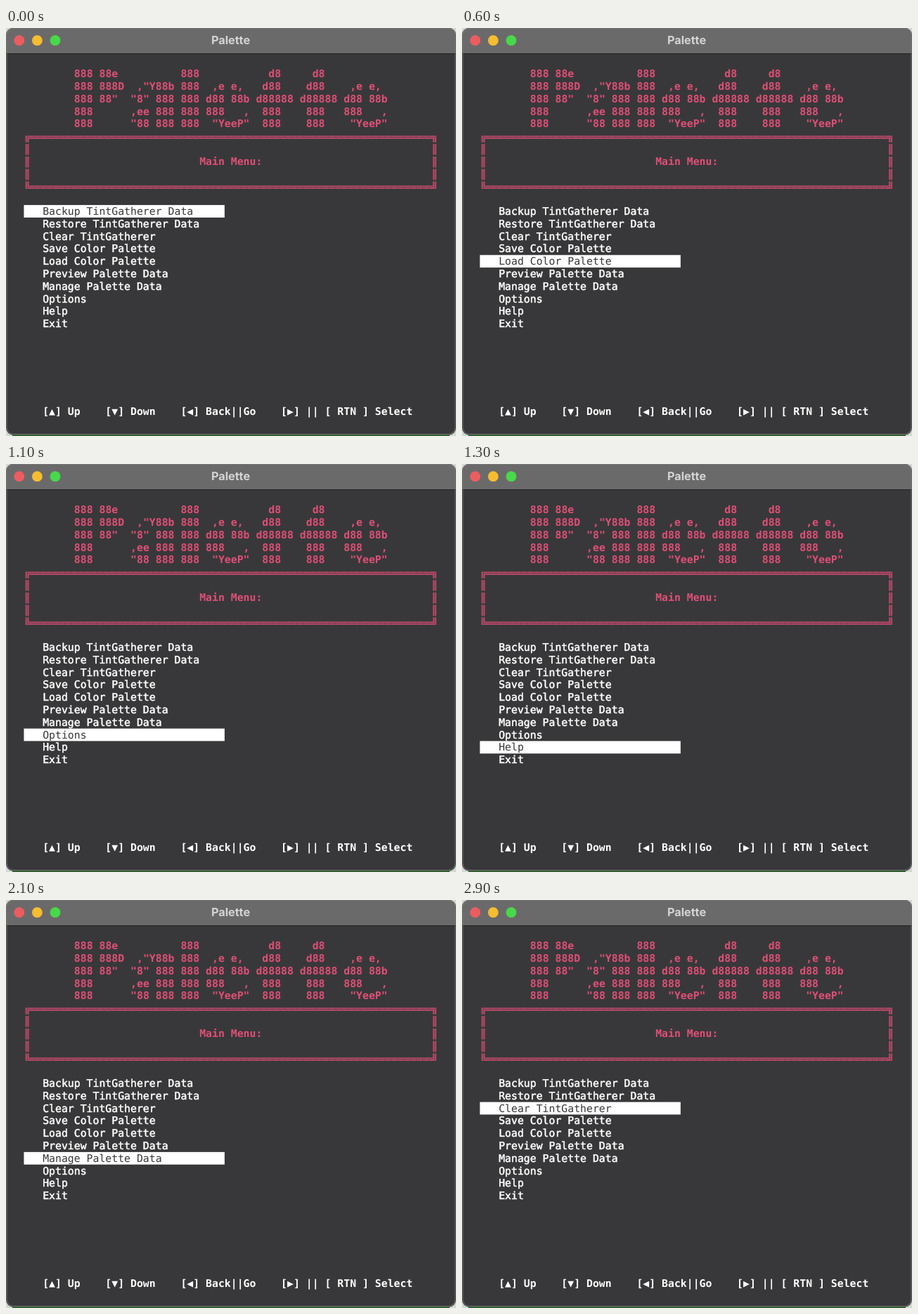
Animation of 640 by 581 pixels, one loop 3000 ms. Source, as an HTML page:

```html
<!DOCTYPE html>
<html lang="en">
<head>
<meta charset="utf-8">
<title>Palette</title>
<style>
  html, body { margin: 0; width: 100%; height: 100%; overflow: hidden; background: #d3d8d3; }
  svg { display: block; width: 100vw; height: 100vh; }
  text { white-space: pre; text-rendering: geometricPrecision; }
  .term { font: 14.82px "DejaVu Sans Mono", monospace; }
  .bold { font-weight: 700; }
  .title { font: 700 16.3px Inter, sans-serif; fill: #d4d4d4; text-anchor: middle; }
  .pink { fill: #e04f76; }
  .white { fill: #fff; }
  .item { fill: #fff; stroke: #fff; stroke-width: .5px; }
  .item.on { fill: #363638; stroke: none; }
  .glow { fill: none; stroke: #843f54; stroke-width: 4.6px; }
  .line { fill: none; stroke: #bd4c6b; stroke-width: 1.4px; }
</style>
</head>
<body>
<svg id="stage" viewBox="0 0 640 581" preserveAspectRatio="none">
  <defs>
    <clipPath id="win"><rect x="0" y="0" width="640" height="579.5" rx="10"/></clipPath>
  </defs>
  <rect x="9" y="578" width="622" height="3" fill="#2f6b2c"/>
  <g clip-path="url(#win)">
    <rect width="640" height="580" fill="#38383a"/>
    <rect width="640" height="36" fill="#6b6a6b"/>
    <rect y="36" width="640" height="1" fill="#232324"/>
  </g>
  <rect x="1" y="0.5" width="638" height="578" rx="10" fill="none" stroke="#757576"/>
  <circle cx="18.8" cy="17.7" r="7.4" fill="#ec5d60"/>
  <circle cx="44.4" cy="17.7" r="7.4" fill="#f5bd30"/>
  <circle cx="70" cy="17.7" r="7.4" fill="#48d94b"/>
  <text class="title" x="319.5" y="23">Palette</text>
</svg>
<script>
const LOOP = 3000;
const COL = 8.92, ROW = 17.8, LEFT = 7.6, TOP = 56.3, ASCENT = 13.8;
const MENU_ROW = 11;

const banner = [
  '888 88e          888           d8     d8',
  '888 888D  ,"Y88b 888  ,e e,   d88    d88    ,e e,',
  '888 88"  "8" 888 888 d88 88b d88888 d88888 d88 88b',
  '888      ,ee 888 888 888   ,  888    888   888   ,',
  '888      "88 888 888  "YeeP"  888    888    "YeeP"'
];
const labels = [
  'Backup TintGatherer Data', 'Restore TintGatherer Data', 'Clear TintGatherer',
  'Save Color Palette', 'Load Color Palette', 'Preview Palette Data',
  'Manage Palette Data', 'Options', 'Help', 'Exit'
];
const footer = '[▲] Up    [▼] Down    [◀] Back||Go    [▶] || [ RTN ] Select';

// Key press times in ms
const downs = [100, 300, 400, 600, 800, 900, 1100, 1300, 1500];
const ups = [1800, 1900, 2100, 2300, 2400, 2600, 2800];

const stage = document.getElementById('stage');

function add(tag, attrs, text = '') {
  const node = document.createElementNS('http://www.w3.org/2000/svg', tag);
  for (const key in attrs) node.setAttribute(key, attrs[key]);
  node.textContent = text;
  stage.append(node);
  return node;
}

const rowTop = row => TOP + row * ROW;

function write(text, col, row, cls) {
  return add('text', { x: LEFT + col * COL, y: rowTop(row) + ASCENT, class: 'term ' + cls }, text);
}

function rule(d, cls, dash, offset) {
  add('path', { d, class: cls, 'stroke-dasharray': dash, 'stroke-dashoffset': offset });
}

const box = { x1: 30.1, y1: 155.7, x2: 609.6, y2: 226.7 };

// Border grown outwards by `grow`; dashes leave the seams between character cells
function border(grow, cls, cap) {
  const x1 = box.x1 - grow, x2 = box.x2 + grow, y1 = box.y1 - grow, y2 = box.y2 + grow;
  for (const y of [y1, y2]) rule(`M${x1 - cap} ${y}H${x2 + cap}`, cls, '8.4 .52', 6);
  for (const x of [x1, x2]) rule(`M${x} ${y1}V${y2}`, cls, '15.4 2.4', y1 - 147.4);
}

banner.forEach((line, i) => write(line, 10, i, 'bold pink'));
border(0, 'glow', 2.3);
border(1.6, 'line', 0.7);
border(-1.6, 'line', 0.7);
write('Main Menu:', 30, 7, 'bold pink');
const bar = add('rect', { x: LEFT + 2 * COL, width: 32 * COL, height: ROW, fill: '#fff' });
const items = labels.map((label, i) => write(label, 5, MENU_ROW + i, 'item'));
write(footer, 5, 27, 'bold white');

const passed = (times, t) => times.filter(at => at <= t).length;

function draw(t) {
  const index = passed(downs, t) - passed(ups, t);
  bar.setAttribute('y', rowTop(MENU_ROW + index));
  items.forEach((item, i) => item.classList.toggle('on', i === index));
}

const start = performance.now();
function tick() {
  draw((performance.now() - start) % LOOP);
  requestAnimationFrame(tick);
}
tick();
</script>
</body>
</html>
```
